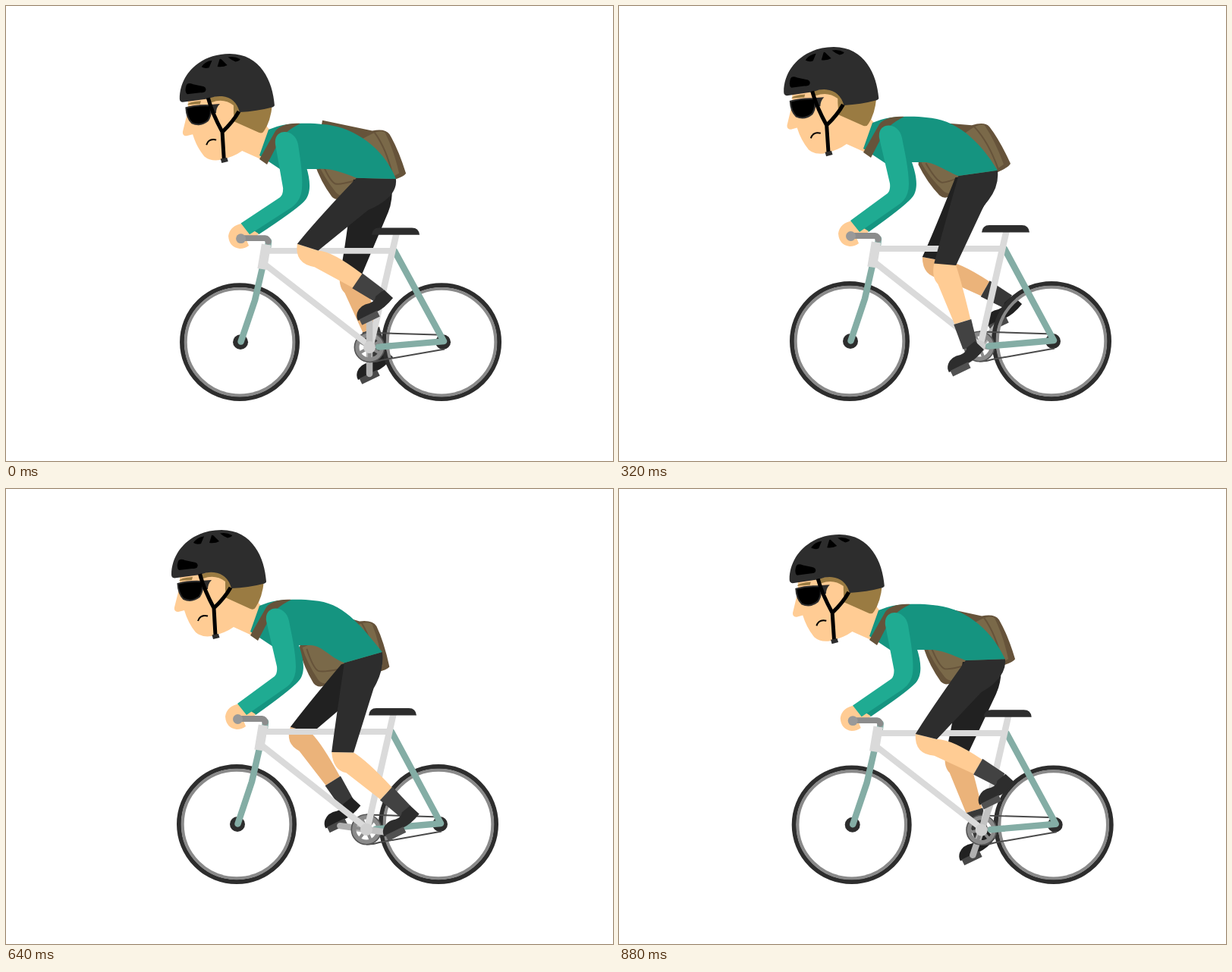
Recreate the animation shown at these times as an HTML page. Size 800 by 600 pixels, loop 960 ms.

```html
<!DOCTYPE html>
<html lang="en">
<head>
<meta charset="utf-8">
<title>Cyclist</title>
<style>
html, body { margin: 0; width: 100%; height: 100%; overflow: hidden; background: #fff; }
svg { display: block; width: 800px; height: 600px; }
.line { fill: none; }
.round { fill: none; stroke-linecap: round; stroke-linejoin: round; }
</style>
</head>
<body>
<svg viewBox="0 0 800 600">
  <g id="pack">
    <path fill="#66533a" d="M404 147L470 159Q487 155 493 163Q505 182 516 214Q514 218 500 223L430 250Q424 252 419 247Q404 228 395 204Z"/>
    <path fill="#7a6949" d="M470 163Q482 157 487 161Q499 183 507 214L499 219L436 245Q429 247 424 241Q407 221 399 202Z"/>
    <path class="line" stroke="#66533a" stroke-width="2" d="M473 161Q490 183 499 219M405 203Q416 227 423 230Q428 232 450 225"/>
  </g>
  <g id="farLeg"></g>

  <g class="bike">
    <g class="line">
      <g stroke="#2d2d2d" stroke-width="6">
        <circle cx="304" cy="442" r="76"/><circle cx="570" cy="442" r="76"/>
      </g>
      <g stroke="#8a8a8a" stroke-width="4">
        <circle cx="304" cy="442" r="71.3"/><circle cx="570" cy="442" r="71.3"/>
      </g>
    </g>
    <g fill="#2d2d2d"><circle cx="305" cy="442" r="10"/><circle cx="572" cy="442" r="10"/></g>
    <path class="line" stroke="#4a4a4a" stroke-width="2" d="M475 429.500L572 432.500M475 468.500Q483 469 492 466L574 451.500"/>
    <g id="ring" class="line"></g>
    <g class="round" stroke="#84ada5" stroke-width="8.5">
      <path d="M508 320L573 441L487 448.500"/>
      <path d="M305.500 441.500L324 386Q329 364 334 342M341 316L342 307"/>
    </g>
    <g class="line" stroke="#dadada" stroke-width="8">
      <path d="M338 320H508M337 338L475 447"/>
      <path stroke-width="8.5" d="M510.500 297L476 449"/>
      <path stroke-width="12.5" d="M339 311.500L333.500 344.500"/>
    </g>
    <path fill="#2d2d2d" d="M478 298.500Q479 289 488 289H531Q540 289 541 298.500Z"/>
  </g>

  <g id="crank"></g>
  <g id="leg"></g>

  <g id="head">
    <path fill="#ffcc94" d="M229 113L229 128L222 156Q221 162 227 162L235 160Q240 177 250 189Q258 196 271 194Q289 190 300 182L324 193L336 154L297 106Z"/>
    <path fill="#9a7b42" d="M254 112L300 104L340 121Q338 143 329 156Q327 160 322 158L289 143L289 122Q276 112 260 118Z"/>
    <path fill="#9a7b42" d="M228 121Q230 117 246 116L245 120Z"/>
    <path fill="#ffcc94" d="M267 131Q266 120 277 118Q289 119 289 132L290 143L272 150Z"/>
    <path fill="#2d2d2d" d="M256 121L271 120Q266 125 266 132L257 132Z"/>
    <path stroke="#2d2d2d" stroke-width="2" d="M226.500 125Q241 121 258 122Q261 133 255 142Q245 150 234 145Q227 138 226.500 125Z"/>
    <path fill="#2d2d2d" d="M218 113C218 82 244 54 284 54C325 54 341 91 343 122Q343 124 339 125Q320 130 297 131Q292 112 274 110Q266 109 256 113L222 117.500Q218 117 218 113Z"/>
    <path d="M227 95Q229 91 236 94L250 97Q254 99 252 103Q251 105 245 105L228 107Q224 104 227 95ZM247 71Q251 64 261 62.500L257 72Q252 74 247 71ZM268 71L271 61Q272 60 274 62L281 69Q276 72 268 71ZM282 58.500Q290 56.500 298 61Q298 63 292 64.500Q286 62 282 58.500Z"/>
    <path class="line" stroke="#000" stroke-width="5" stroke-linejoin="round" d="M255.500 112Q261 133 274 157L276 193M296 130Q288 144 274 157"/>
    <path fill="#2d2d2d" d="M271.500 192.500L280 191L281.500 196L273 198Z"/>
    <path class="line" stroke="#000" stroke-width="2" d="M253 174Q256 165 266 167.500"/>
  </g>

  <path id="torso" fill="#159480"/>
  <path id="strap" fill="#66533a"/>
  <path id="farArm" fill="#159480"/>
  <g class="bike">
    <path fill="#ffcc94" d="M308 283Q291 286 289 300Q290 315 304 317Q311 317 316 313L312 303L326 301L329 297L318 290Z"/>
  </g>
  <path id="arm" fill="#1fab92"/>
  <g class="bike">
    <path class="round" stroke="#8c8c8c" stroke-width="8" d="M311 303H337Q341 303.500 341.500 307.500"/>
    <circle cx="305.500" cy="303.500" r="6.5" fill="#999"/>
  </g>
</svg>

<script>
const STEP = 80, COUNT = 12;
const GROUND = 521, CRANK = 39, THIGH = 128, SHIN = 114, SOCK = 35;
const near = { shorts: '#2d2d2d', skin: '#ffcc94', sock: '#424242', shoe: '#2d2d2d', pedal: '#515151' };
const far = { shorts: '#212121', skin: '#ebb37a', sock: '#383838', shoe: '#212121', pedal: '#484848' };

// Crank turn over half a revolution, and the sway of the backpack.
const turn = [0, 43, 82, 112, 140, 161];
const packX = [474, 474.5, 474.7, 474.5, 474.3, 470, 464, 460, 465, 469, 472, 473];
const packY = [205, 206.5, 208, 207, 206, 209, 214, 220, 224, 221, 217, 211];
const packTilt = [0, -1, -1.6, -4, -7, -3, 2, 5, 5, 4, 2, .5];

const byId = id => document.getElementById(id);
const set = (el, name, value) => el.setAttribute(name, value);
const rad = deg => deg * Math.PI / 180;
const add = (p, q, k = 1) => [p[0] + q[0] * k, p[1] + q[1] * k];
const at = (p, a, u, b, v) => add(add(p, a, u), b, v);
const polar = (a, r = 1) => [r * Math.cos(a), r * Math.sin(a)];
const angle = (p, q) => Math.atan2(q[1] - p[1], q[0] - p[0]);
const spin = ([x, y], a) => [x * Math.cos(a) - y * Math.sin(a), x * Math.sin(a) + y * Math.cos(a)];
const xy = p => p.map(v => v.toFixed(2)).join(' ');
const warp = (d, move) => d.replace(/(-?[\d.]+) (-?[\d.]+)/g, (_, x, y) => xy(move(+x, +y)));
const path = (fill, parts) =>
  `<path fill="${fill}" d="${parts.map(p => Array.isArray(p) ? xy(p) : p).join(' ')}"/>`;

const STRAP = 'M376 146C360 145 348 149 343 156L322 193L332 200L346 173Q353 157 376 146Z';
const ARM = 'M343 174C340 152 369 152 373 174C376 190 382 215 382 235Q382 252 370 261L317 298L305 283L354 247Q358 243 357 234Z';
const FAR_ARM = 'M366 170L386 206C392 223 396 243 385 254Q374 266 329 298L316 292L366 255Z';

function kneeOf(hip, ankle) {
  const dist = Math.min(Math.hypot(ankle[0] - hip[0], ankle[1] - hip[1]), THIGH + SHIN - .5);
  const bend = Math.acos((THIGH ** 2 + dist ** 2 - SHIN ** 2) / (2 * THIGH * dist));
  return add(hip, polar(angle(hip, ankle) + bend, THIGH));
}

function leg(hip, back, front, pedal, ink) {
  const ankle = add(pedal, [13, -29]);
  const knee = kneeOf(hip, ankle);
  const down = angle(hip, knee), shin = angle(knee, ankle);
  const d = polar(down), n = polar(down - Math.PI / 2);
  const e = polar(shin), f = polar(shin + Math.PI / 2);
  const hem = polar((down - Math.PI / 2) * .5 - rad(5), 14.5);
  const kneeF = add(knee, hem, -1), kneeB = add(knee, hem);
  const cuff = add(ankle, e, -SOCK);
  return path(ink.skin, ['M', kneeF, 'Q', at(knee, d, 14, f, 14), at(knee, e, 22, f, 16.5),
      'L', add(cuff, f, 11), 'L', add(cuff, f, -11), 'Q', at(knee, e, 30, f, -14), kneeB, 'Z'])
    + path(ink.sock, ['M', add(cuff, f, 12), 'L', add(cuff, f, -12),
      'L', add(ankle, f, -10), 'L', add(ankle, f, 10), 'Z'])
    + path(ink.shorts, ['M', front, 'Q', at(knee, d, -28, n, -17), kneeF, 'L', kneeB,
      'L', at(hip, d, 37, n, 22), 'Q', add(back, [3, 24]), back, 'Z'])
    + `<g transform="translate(${xy(pedal)})">`
    + `<path fill="${ink.shoe}" d="M19 -37L31 -26Q20 -12 8 -7L-15 4Q-18 -1 -16 -7Q-12 -17 0 -19Q8 -22 8 -28Z"/>`
    + `<rect fill="${ink.pedal}" x="-13" y="-4" width="26" height="8.5" transform="rotate(-26)"/></g>`;
}

const bar = (p, q, color) =>
  `<path class="round" stroke="${color}" stroke-width="8.5" d="M${xy(p)}L${xy(q)}"/>`;

function ring(a) {
  let spokes = '';
  for (let i = 0; i < 6; i++) {
    spokes += `M475 449L${xy(add([475, 449], polar(a + i * Math.PI / 3, 17)))}`;
  }
  return '<circle cx="475" cy="449" r="16.5" stroke="#8a8a8a" stroke-width="6"/>'
    + '<circle cx="475" cy="449" r="19.7" stroke="#555" stroke-width="1.6"/>'
    + `<path stroke="#8a8a8a" stroke-width="4" d="${spokes}"/>`;
}

function draw(k) {
  const phase = k * Math.PI / 3;
  const u = Math.cos(phase) + .5;
  const bob = [8 * u, 6 * u];
  const dx = 2.7 * u, sy = 1 - .0097 * u;
  const lift = (x, y) => add([x, y], bob);
  document.querySelectorAll('.bike').forEach(g =>
    set(g, 'transform', `translate(${dx} ${GROUND * (1 - sy)}) scale(1 ${sy})`));

  // Pelvis
  const w = Math.cos((k - .9) * Math.PI / 6);
  const tilt = rad(-7.5 + 10 * w);
  const hip = lift(473.3 + 2.9 * w, 220.3 - 2.2 * w);
  const back = add(hip, polar(tilt, 26)), front = add(hip, polar(tilt, -26));

  // Pedals and legs
  const a = rad(-90 - turn[k % 6] - (k >= 6 ? 180 : 0));
  const hub = [475 + dx, GROUND - 72 * sy];
  const pedal = add(hub, polar(a, CRANK)), farPedal = add(hub, polar(a, -CRANK));
  byId('farLeg').innerHTML = leg(add(hip, [6, 3]), add(back, [-6, 3]), add(front, [-4, 2]), farPedal, far)
    + bar(hub, add(hub, polar(a, 4 - CRANK)), '#b0b0b0');
  byId('ring').innerHTML = ring(a);
  byId('crank').innerHTML = bar(hub, add(hub, polar(a, CRANK - 3)), '#c2c2c2')
    + `<circle cx="${hub[0]}" cy="${hub[1]}" r="8" fill="#cfcfcf"/>`;
  byId('leg').innerHTML = leg(hip, back, front, pedal, near);

  // Upper body
  set(byId('pack'), 'transform',
    `translate(${xy(lift(packX[k] - 474.7, packY[k] - 208.3))}) rotate(${packTilt[k] + 1.6} 474.7 208.3)`);
  set(byId('head'), 'transform',
    `translate(${7.5 * u} ${6 * u}) rotate(${.35 * Math.sin(phase) - .3} 290 190)`);
  const bend = add(back, spin([-18, -43], tilt));
  const waist = add(front, [-20, -8]);
  set(byId('torso'), 'd',
    warp('M345 150C360 145 390 145 405 147C443 149', lift) + ` ${xy(bend)} ${xy(back)}`
    + `L${xy(front)}C${xy(waist)} `
    + warp('415 205 400 206L384 206L352 208L322 188L334 154Z', lift));
  set(byId('strap'), 'd', warp(STRAP, lift));
  const sleeve = (x, y) => {
    const r = Math.max(0, Math.min(1, (290 - y) / 110));
    return [x + u * (2.7 + 5.3 * r), y + u * (2.2 + 3.4 * r)];
  };
  set(byId('arm'), 'd', warp(ARM, sleeve));
  set(byId('farArm'), 'd', warp(FAR_ARM, sleeve));
}

const start = performance.now();
let shown = -1;
function tick() {
  const k = Math.floor((performance.now() - start) / STEP) % COUNT;
  if (k !== shown) draw(shown = k);
  requestAnimationFrame(tick);
}
tick();
</script>
</body>
</html>
```
